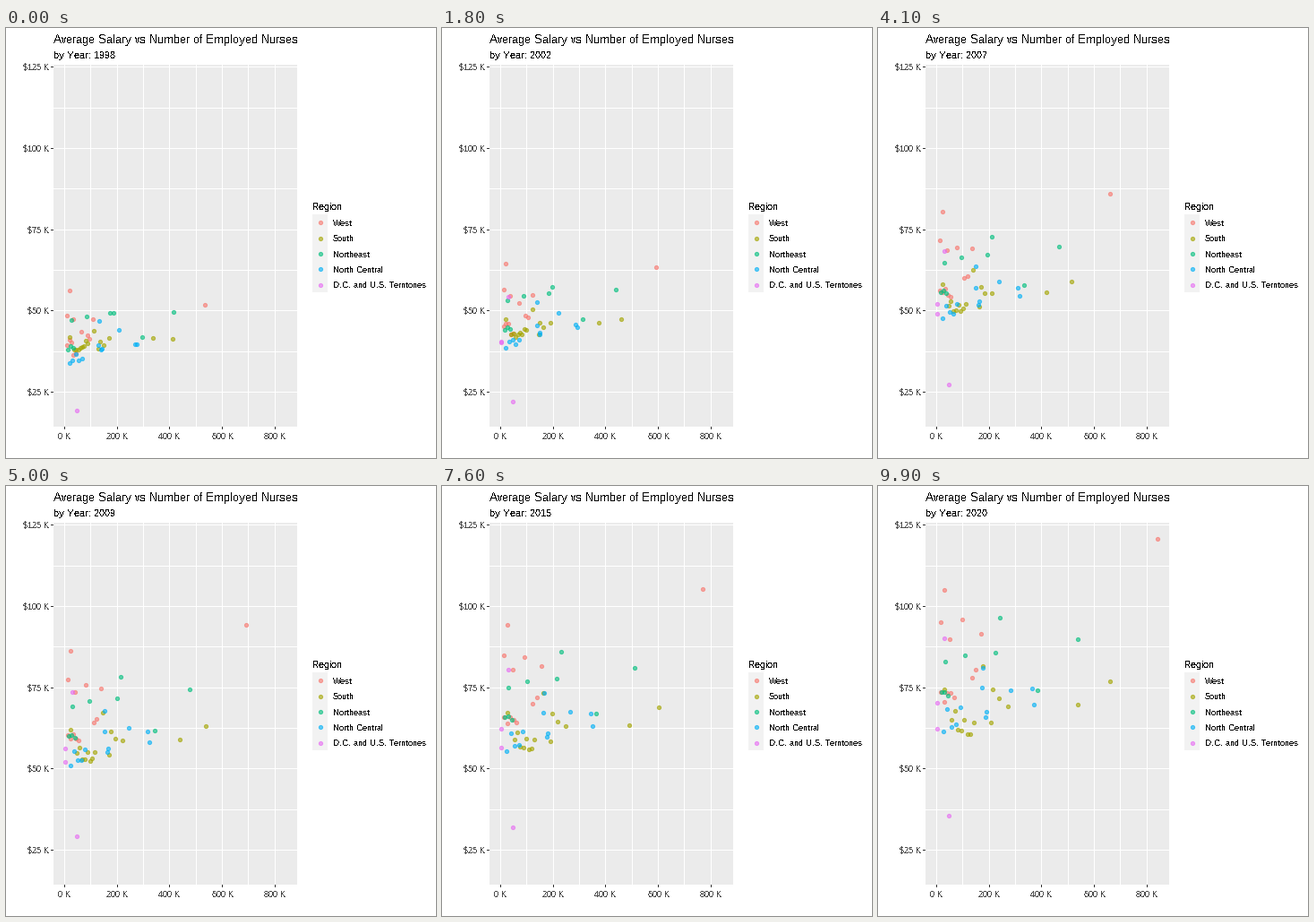
These frames come from a looping animation (480 px wide and 480 px high, 10 s). A matplotlib script:

```python
import numpy as np
import matplotlib.pyplot as plt
from matplotlib.animation import FuncAnimation
from matplotlib.patches import Rectangle

plt.rcParams.update({
    "font.family": "Liberation Sans",
    "text.hinting": "native",
    "text.hinting_factor": 1,
    "text.antialiased": False,
})

SIZE, FRAMES, INTERVAL = 480, 100, 100
LEFT, TOP, RIGHT, BOTTOM = 53, 41, 325, 445
FIRST, LAST = 1998, 2020
rng = np.random.default_rng(7)


def px(employed):
    return 65.6 + 0.2932 * employed


def py(salary):
    return 43.8 + 3.628 * (125 - salary)


def trend(year):
    """Share of the whole pay rise reached by a year; it stalls after 2011."""
    return np.interp(year, (1998, 2002, 2005, 2011, 2015, 2020),
                     (0, 0.17, 0.37, 0.73, 0.78, 1))


def crowd(count, employed, start, end):
    """Small states: even head counts, pay scattered within a range."""
    return np.column_stack([np.linspace(*employed, count),
                            rng.uniform(*start, count),
                            rng.uniform(*end, count)])


class Region:
    """Dots given as (employed in K, first salary, last salary)."""

    def __init__(self, name, color, growth, leaders, small=None):
        self.name, self.color, self.growth = name, color, growth
        self.data = np.array(leaders, float)
        if small is not None:
            self.data = np.vstack([self.data, small])

    def at(self, year):
        employed, start, end = self.data.T
        time = (year - FIRST) / (LAST - FIRST)
        x = px(employed * (1 + (self.growth - 1) * time))
        y = py(start + (end - start) * trend(year))
        return np.column_stack([x, y])


regions = [
    Region("West", "#F8766D", 1.57,
           [(535, 51.8, 120.7), (18, 56.4, 105), (9, 48.7, 95.3),
            (108, 47.6, 91.5), (31, 47.6, 89.9), (62, 43.5, 96.1),
            (95, 41.3, 80.6), (85, 42.4, 78.1)],
           crowd(5, (9, 42), (35, 42), (70.5, 74))),
    Region("South", "#A3A500", 1.6,
           [(412, 41.3, 77), (335, 41.7, 69.8), (110, 44, 81.7),
            (18, 42.1, 74.4), (134, 40.5, 74.5), (147, 39.4, 71.7),
            (169, 41.6, 69.3), (129, 38.5, 64.3)],
           crowd(8, (36, 88), (37, 41), (60.5, 68))),
    Region("Northeast", "#00BF7D", 1.3,
           [(414, 49.8, 89.9), (186, 49.3, 96.6), (172, 49.3, 85.8),
            (82, 48.3, 85), (24, 47.2, 83), (296, 42.1, 74.2)],
           crowd(3, (13, 33), (37, 39.5), (71.5, 76))),
    Region("North Central", "#00B0F6", 1.35,
           [(130, 46.9, 81.1), (207, 44.2, 74.2), (269, 39.9, 74.8),
            (275, 39.9, 69.8), (128, 39.5, 75.1), (138, 38.1, 66),
            (140, 38.4, 67.6)],
           crowd(5, (18, 66), (34, 38), (61.5, 70))),
    Region("D.C. and U.S. Territories", "#E76BF3", 1,
           [(45, 19.4, 35.6), (27, 47, 90.2), (1, 36, 62.4), (0, 34, 70.4)]),
]
territories = regions[-1]

fig = plt.figure(figsize=(SIZE / 72, SIZE / 72), dpi=72, facecolor="white")
ax = fig.add_axes([0, 0, 1, 1])
ax.set(xlim=(0, SIZE), ylim=(SIZE, 0))
ax.axis("off")


def box(x, y, w, h, color):
    ax.add_patch(Rectangle((x, y), w, h, fc=color, ec="none", lw=0, aa=False))


def label(x, y, s, size, color="black", ha="left"):
    return ax.text(x, y, s, size=size, color=color, ha=ha, va="baseline",
                   parse_math=False)


def dots(color, points):
    return ax.scatter(*np.transpose(points), s=18, c=color, edgecolors=color,
                      linewidths=1, alpha=0.62, zorder=3)


box(LEFT, TOP, RIGHT - LEFT, BOTTOM - TOP, "#EBEBEB")
for k in range(9):
    x, y = int(px(100 * k)), int(py(125 - 12.5 * k))
    box(x, TOP, 1, BOTTOM - TOP, "white")
    box(LEFT, y, RIGHT - LEFT, 1, "white")
    if k % 2 == 0:
        box(x, BOTTOM, 1, 3, "#333333")
        box(LEFT - 3, y, 3, 1, "#333333")
        label(x + 0.5, 459, f"{100 * k} K", 9, "#4D4D4D", "center")
        label(48, y + 4, f"${125 - 12.5 * k:.0f} K", 9, "#4D4D4D", "right")

label(53, 17, "Average Salary vs Number of Employed Nurses", 13)
subtitle = label(53, 34, "", 11)
label(342, 203, "Region", 11)

clouds = []
for k, region in enumerate(regions):
    y = 217 + 17.3 * k
    box(342, round(y - 9), 17, 18, "#F2F2F2")
    dots(region.color, [(350.5, y + 0.3)])
    label(365, round(y + 4), region.name, 9)
    clouds.append(dots(region.color, region.at(FIRST)))


def update(i):
    year = FIRST + (LAST - FIRST) * i / (FRAMES - 1)
    subtitle.set_text(f"by Year: {round(year)}")
    for region, cloud in zip(regions, clouds):
        points = region.at(year)
        if region is territories and year < 1999:
            points = points[:1]  # the others report from 1999 on
        cloud.set_offsets(points)
    return [subtitle, *clouds]


anim = FuncAnimation(fig, update, frames=FRAMES, interval=INTERVAL,
                     repeat=True, repeat_delay=0)
plt.show()
```
